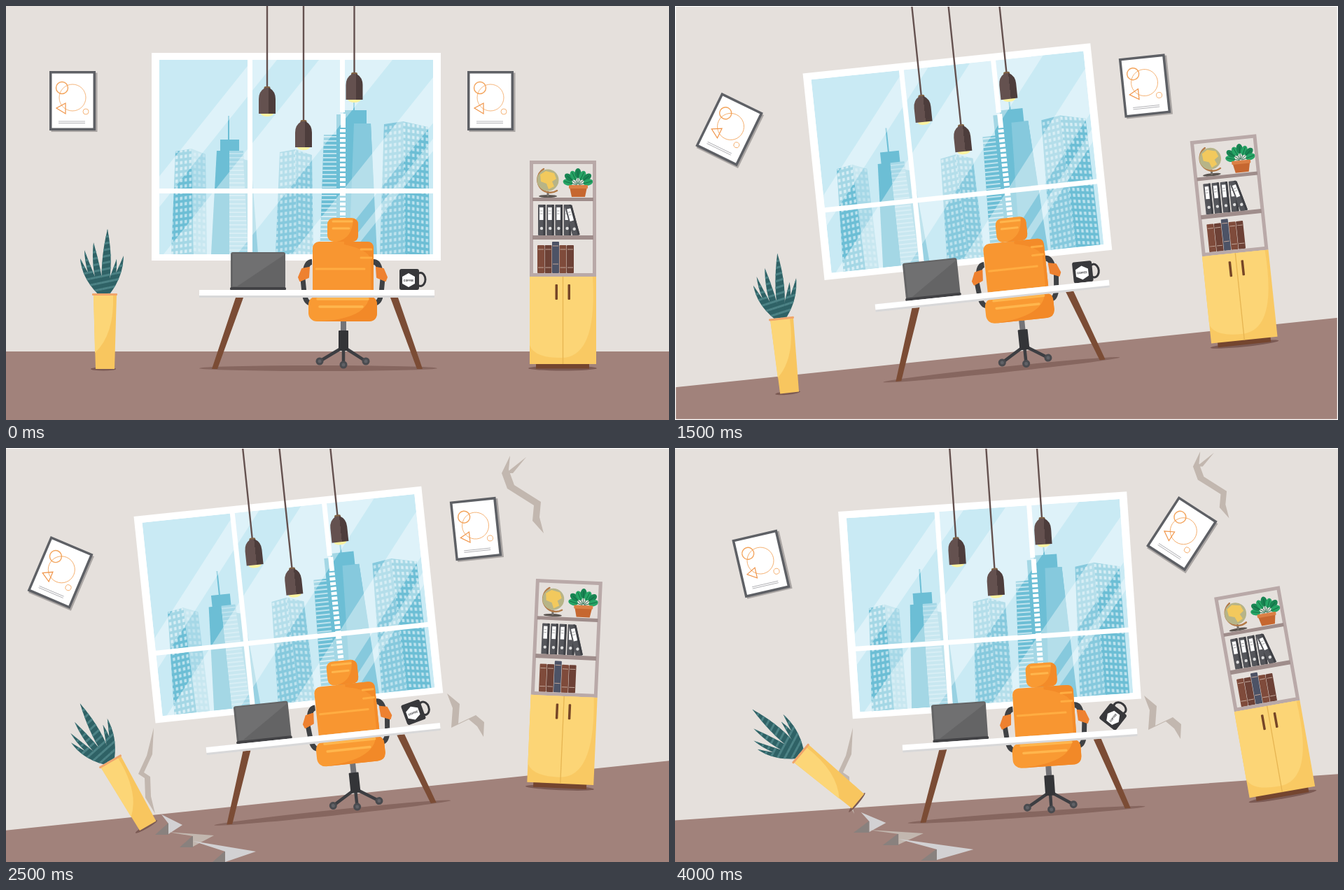
Recreate the animation shown at these times as an HTML page. Size 947 px wide and 592 px high, loop 8 s.

```html
<!DOCTYPE html>
<html lang="en">
<head>
<meta charset="utf-8">
<title>Shaking office</title>
<style>
html, body { margin: 0; width: 100%; height: 100%; overflow: hidden; background: #e5e0dc; }
svg { display: block; width: 100vw; height: 100vh; }
</style>
</head>
<body>
<svg id="stage" viewBox="0 0 947 592"></svg>
<script>
const rect = (x, y, w, h, fill, r = 0) => `<rect x="${x}" y="${y}" width="${w}" height="${h}" rx="${r}" fill="${fill}"/>`;
const poly = (points, fill, extra = '') => `<polygon points="${points}" fill="${fill}" ${extra}/>`;
const oval = (x, y, rx, ry, fill) => `<ellipse cx="${x}" cy="${y}" rx="${rx}" ry="${ry}" fill="${fill}"/>`;
const path = (d, fill) => `<path d="${d}" fill="${fill}"/>`;
const line = (d, color, w, cap = 'round') => `<path d="${d}" fill="none" stroke="${color}" stroke-width="${w}" stroke-linecap="${cap}" stroke-linejoin="round"/>`;
const group = (id, body) => `<g id="${id}">${body}</g>`;
const turned = (a, x, y, body) => `<g transform="rotate(${a} ${x} ${y})">${body}</g>`;
const many = (n, fn) => Array.from({ length: n }, (_, i) => fn(i)).join('');

const panes = (id, skew) => `<pattern id="${id}" width="6.5" height="8.5" patternUnits="userSpaceOnUse" patternTransform="skewY(${skew})">${rect(1.5, 2, 3.5, 4.5, '#bfe3ee')}</pattern>`;
const defs = `<defs>${panes('panesL', -8)}${panes('panesR', 8)}
<pattern id="floors" width="40" height="6" patternUnits="userSpaceOnUse">${rect(0, 0, 40, 2, '#bfe3ee')}</pattern>
<pattern id="bands" width="40" height="9" patternUnits="userSpaceOnUse" patternTransform="rotate(-12)">${rect(0, 0, 40, 3, '#4c8285')}</pattern>
<linearGradient id="shade"><stop offset=".6" stop-color="#64514f"/><stop offset=".6" stop-color="#4d3d3c"/></linearGradient>
<clipPath id="glass">${rect(219, 77, 391, 278)}</clipPath>
</defs>`;

// ---- window and skyline
const dark = '#6cbed5', mid = '#86c9dd', pale = '#a6d8e7';
const face = (points, fill, pattern) => poly(points, fill) + poly(points, `url(#${pattern})`);
const tower = (l, m, r, y, left, right) =>
  face(`${l},${y + 4} ${m},${y} ${m + 3},355 ${l - 6},355`, left, 'panesL') +
  face(`${m},${y} ${r},${y + 8} ${r + 2},355 ${m + 3},355`, right, 'panesR');
const streak = (x, w) => poly(`${x},355 ${x + w},355 ${x + w + 222},77 ${x + 222},77`, '#fff', 'opacity=".38"');

const skyline = rect(219, 77, 391, 278, '#c9eaf4') +
  tower(242, 265, 285, 204, dark, pale) +
  line('M318 157V195', dark, 2, 'butt') + rect(306, 191, 27, 18, dark) +
  poly('301,207 319,207 319,355 293,355', dark) +
  face('319,207 339,207 347,355 319,355', pale, 'floors') +
  poly('339,219 350,222 360,355 346,355', '#98d1e2') +
  tower(391, 413, 437, 205, mid, mid) +
  face('454,184 473,184 473,355 448,355', dark, 'floors') +
  line('M497 138V152', dark, 2, 'butt') +
  poly('472,155 482,155 482,149 515,149 515,168 521,168 529,355 472,355', dark) +
  poly('497,168 521,168 530,355 490,355', mid) +
  tower(540, 567, 603, 165, mid, dark) +
  streak(130, 35) + streak(225, 105) + streak(408, 52) + streak(478, 14);

const windowArt = rect(208, 67, 413, 297, '#fff') +
  `<g clip-path="url(#glass)">${skyline}</g>` +
  rect(345, 70, 7, 290, '#fff') + rect(477, 70, 7, 82, '#fff') +
  rect(478, 154, 7, 20, '#fff') + many(23, i => rect(477, 176 + i * 7, 8, 4.5, '#fff')) +
  rect(210, 261, 408, 7, '#fff');

// ---- hanging lamps, y is the lower rim
const lamp = (x, y) => line(`M${x} -120V${y - 36}`, '#64514f', 2.4) +
  oval(x, y, 9, 4, '#fbf3a0') + rect(x - 4.5, y - 39, 9, 5, '#806345', 2) +
  path(`M${x - 12} ${y}v-21q0-11 9-16h6q9 5 9 16v21z`, 'url(#shade)');
const lamps = lamp(373, 154) + lamp(425, 202) + lamp(497.5, 134);

// ---- framed drawing
const ring = (x, y, r, w) => `<circle cx="${x}" cy="${y}" r="${r}" fill="none" stroke="#f3a45c" stroke-width="${w}"/>`;
const picture = rect(64.5, 95.5, 66, 84.5, '#aaa5a3') + rect(62, 93, 66, 85, '#5e6065') +
  rect(65.5, 96.5, 59, 78, '#fff') + ring(80, 117, 8.5, 1.4) + ring(95, 131, 19, .8) + ring(114, 151, 4, .8) +
  poly('72,146 85,139 85,154', 'none', 'stroke="#f0954a" stroke-width="1.2"') +
  line('M75 165H113M75 167.5H113', '#a3a3a8', .8, 'butt');

// ---- plant
function leaf(tipX, tipY, w) {
  const x = 140 + (tipX - 139) * .2, cx = x + (tipX - x) * .7, cy = 411 + (tipY - 411) * .45;
  const d = `M${x - 3} 411Q${cx - w} ${cy} ${tipX} ${tipY}Q${cx + w} ${cy} ${x + 3} 411z`;
  return path(d, '#2f6266') + path(d, 'url(#bands)');
}
const plant = oval(139, 519, 18, 2.5, '#7b5a54') +
  leaf(106, 361, 6) + leaf(168, 357, 6) + leaf(112, 349, 6) + leaf(158, 362, 6) + leaf(125, 338, 8) + leaf(145, 319, 11) +
  poly('125,413 158,413 155,519 128,519', '#f8c65f') +
  path('M125 413H153Q155 470 127 496z', '#fcd677') + rect(123, 411, 36, 3, '#f0a56b', 1);

// ---- bookcase
const binder = x => rect(x, 284, 10.5, 44, '#55565b', 1) + rect(x + 7.5, 284, 3, 44, '#3f4045') +
  rect(x + 2, 288, 5.5, 18, '#fff') + line(`M${x + 3} 293h3m-3 4h3`, '#999', .8) + oval(x + 5, 318, 2.2, 2.2, '#ddd');
const book = i => {
  const x = 759 + i * 10.5, y = 342 - (i === 2 ? 5 : 0);
  return rect(x, y, 10, 382 - y, ['#7f4b3b', '#6d4136', '#4d5366'][i % 3], 1) +
    line(`M${x + 1} ${y + 6}h8m0 26h-8`, '#c0a598', 1, 'butt');
};
const globe = oval(774, 272, 13, 2, '#5b5450') + line('M774 266V271', '#77706a', 3) +
  line('M768 233A18 18 0 1 0 787 264', '#b27a48', 2.4) + oval(774, 249, 15.5, 15.5, '#b7b487') +
  poly('763,241 771,236 783,239 786,247 780,251 783,258 775,262 772,254 764,251', '#f2c95d');
const greenery = many(7, i => turned(-75 + i * 25, 817, 256,
  oval(817, 241 - i % 2 * 2, 4.5, 7, i % 2 ? '#198553' : '#27a566') + line('M817 236V254', '#11643f', .8)));
const bookcase = oval(795, 518, 49, 3.5, '#7b5a54') + rect(757, 511, 76, 7.5, '#74452f') +
  globe + greenery + poly('805,259 830,259 827,273 808,273', '#c66730') + rect(804, 256, 27, 5, '#db8045', 1) +
  many(4, i => binder(760 + i * 12.2)) + turned(-15, 816, 327, binder(809)) + many(5, book) +
  '<rect x="750.5" y="223.5" width="90" height="161" fill="none" stroke="#b9a9a8" stroke-width="5"/>' +
  rect(752, 274, 87, 5, '#9f8d8b') + rect(752, 328, 87, 6, '#9f8d8b') +
  rect(748, 387, 95, 125, '#f9c963') +
  path('M748 387H838Q845 503 793 503Q754 503 748 485z', '#fcd576') +
  line('M795.5 387V512', '#e6b552', 1.3, 'butt') + rect(784.5, 398, 3.5, 22, '#764627', 1) + rect(802.5, 398, 3.5, 22, '#764627', 1);

// ---- chair, desk and desk items
const arm = line('M437 366Q430 366 428 378', '#3f4144', 8, 'butt') + line('M424 390L426 411Q428 425 436 425', '#3f4144', 7, 'butt') +
  poly('423,376 433,374 432,388 420,393 418,388', '#ee8130', 'stroke="#ee8130" stroke-width="2" stroke-linejoin="round"');
const wheel = (x, y) => oval(x, y, 5.5, 5.5, '#4a4b4f') + oval(x, y, 2.5, 2.5, '#606166');
const chair = line('M478 490L448 508M486 490L514 508M482 490V512', '#3d3e42', 4.5) +
  wheel(448, 508) + wheel(514, 508) + wheel(482, 513) +
  rect(478, 448, 8, 18, '#737377') + rect(475, 464, 14, 29, '#343538', 1) +
  arm + `<g transform="translate(962 0) scale(-1 1)">${arm}</g>` +
  rect(438, 337, 87, 80, '#f89631', 9) +
  path('M483 337H516Q525 337 525 346V408H521V362Q517 348 483 341z', '#f38b29') +
  line('M507 348H522M443 376H512M507 360H522', '#ffad42', 3) +
  rect(459, 303, 44, 34, '#f99a33', 9) +
  path('M496 304Q503 305 503 312V328Q503 337 494 337H472Q495 333 496 304z', '#f38b29') +
  line('M467 308H494M467 318H490', '#ffb64d', 3) +
  rect(432, 415, 98, 36, '#f99a33', 12) +
  path('M530 427V439Q530 451 518 451H444Q515 448 519 415Q530 416 530 427z', '#f28928') +
  line('M445 419H517M448 430H509', '#ffb64d', 3.5);
const desk = rect(276, 406, 336, 11, '#d8d8d9') + rect(276, 406, 336, 8, '#fff');
const legs = poly('328,417 339,417 302,519 294,519', '#7b4c35') + poly('549,417 560,417 595,519 587,519', '#7b4c35');
const laptop = rect(321, 352, 78, 52, '#646465', 3) + poly('324,354 397,354 397,356 330,401 324,401', '#707071') + rect(320, 402, 80, 4.5, '#424245', 2);
const mug = '<ellipse cx="592" cy="391" rx="7" ry="9.5" fill="none" stroke="#38383b" stroke-width="3"/>' +
  rect(562, 376, 28, 30, '#38383b', 3) + poly('575,382 584,387 584,397 575,402 566,397 566,387', '#fff') +
  '<text x="575" y="393.5" font-family="Roboto, sans-serif" font-weight="700" font-size="4" text-anchor="middle" fill="#38383b">COFFEE</text>';

// ---- cracks: one jagged edge and its shifted copy, meeting at both ends
const gap = '#c2b7af';
function crack(edge, dx, dy) {
  const points = edge.split(' ').map(p => p.split(',').map(Number));
  const back = points.slice(1, -1).reverse().map(([x, y]) => [x + dx, y + dy]);
  return poly([...points, ...back].join(' '), gap);
}
const chasm = (x, y, w, h, cx, cy, fill) =>
  poly(`${cx - 19},${cy + 16} ${cx},${cy - 1} ${cx},${cy + 16}`, '#89817e') +
  poly(`${x},${y} ${x + w},${y + h} ${cx},${cy + 15} ${cx},${cy}`, fill);
const cracks = group('crackTop', crack('720,11 708,36 716,58 754,82 752,104 768,122', 10, -5) + poly('743,13 714,36 724,36', gap)) +
  group('crackRight', crack('630,351 638,372 636,400 661,388 673,398 682,413', 10, -6)) +
  group('crackLeft', crack('211,400 201,440 189,466 198,472 199,500 213,523', 8, -2)) +
  group('crackFloor', chasm(222, 524, 30, 15, 232, 537, '#d2d1d3') +
    chasm(231, 549, 66, 5, 267, 555, gap) + chasm(267, 562, 90, 15, 313, 577, '#d2d1d3'));

document.getElementById('stage').innerHTML = defs + rect(0, 0, 947, 592, '#e5e0dc') +
  group('floor', rect(-200, 494, 1400, 400, '#a1827b')) + group('cracks', cracks) +
  group('room', windowArt + lamps + group('leftPic', picture) +
    group('rightPic', `<g transform="translate(597 0)">${picture}</g>`) +
    group('plant', plant) + group('bookcase', bookcase) +
    oval(446, 518, 170, 4, '#86665f') + legs + chair + laptop + group('mug', mug) + desk) +
  group('rim', line('M0 0H947', '#fff', 2)) + group('sides', line('M0 0V592H947V0', '#fff', 2.5));

// ---- motion: a pose every half second, the last one holds
const el = id => document.getElementById(id);
const show = (id, on) => el(id).style.display = on ? '' : 'none';
const place = (id, x, y, more = '') => el(id).setAttribute('transform', `translate(${x} ${y}) ${more}`);

function pose(s) {
  const ramp = (a, b) => Math.min(1, Math.max(0, (s - a) / (b - a)));
  const crash = ramp(3, 5), slide = ramp(5, 7), end = ramp(7, 8);
  const x = -3 * ramp(0, 3) + 41.5 * slide + 2 * end;
  const y = .5 * ramp(0, 1) + 1.5 * crash + 3 * end;
  const spin = `rotate(${2 * end - 6 * ramp(0, 3)} 473.5 296)`;
  const tumble = (id, a, px, py, dx = 0, dy = 0) => place(id, dx, dy, `rotate(${a} ${px} ${py})`);

  place('room', x, y, spin);
  place('floor', 0, y, spin);
  tumble('leftPic', 17 * ramp(0, 1) + 15 * ramp(1, 3) - 6 * ramp(3, 7) - 35 * end, 95, 136, -2 * end, -2 * end);
  tumble('rightPic', 37 * end, 692, 136, 3 * end, -3 * end);
  tumble('plant', -24 * crash - 22 * end, 138, 419, -5 * end, -4 * end);
  tumble('bookcase', 8.5 * crash - 16.5 * slide + 2 * end, 795.5, 366.5, 2 * end, 0);
  tumble('mug', -14 * crash - 34 * slide, 576, 391, 3 * end, -4 * crash);

  place('crackTop', 128 * slide + 3 * end, -5.5 * slide + end, `scale(${1 - .14 * slide})`);
  place('crackRight', 39 * slide + end, slide + 2 * end);
  place('crackLeft', 43 * slide, 4 * end - 4 * slide);
  place('crackFloor', 41.5 * slide - 40 * end, 2.5 * end - 5.5 * slide, `scale(${1 + .19 * end} 1)`);
  show('cracks', s >= 5);
  show('rim', s > 0);
  show('sides', s > 0 && s < 5);
}

const start = performance.now();
let shown = -1;
function tick() {
  const s = Math.min(8, Math.floor((performance.now() - start) % 8000 / 500));
  if (s !== shown) pose(shown = s);
  requestAnimationFrame(tick);
}
tick();
</script>
</body>
</html>
```
